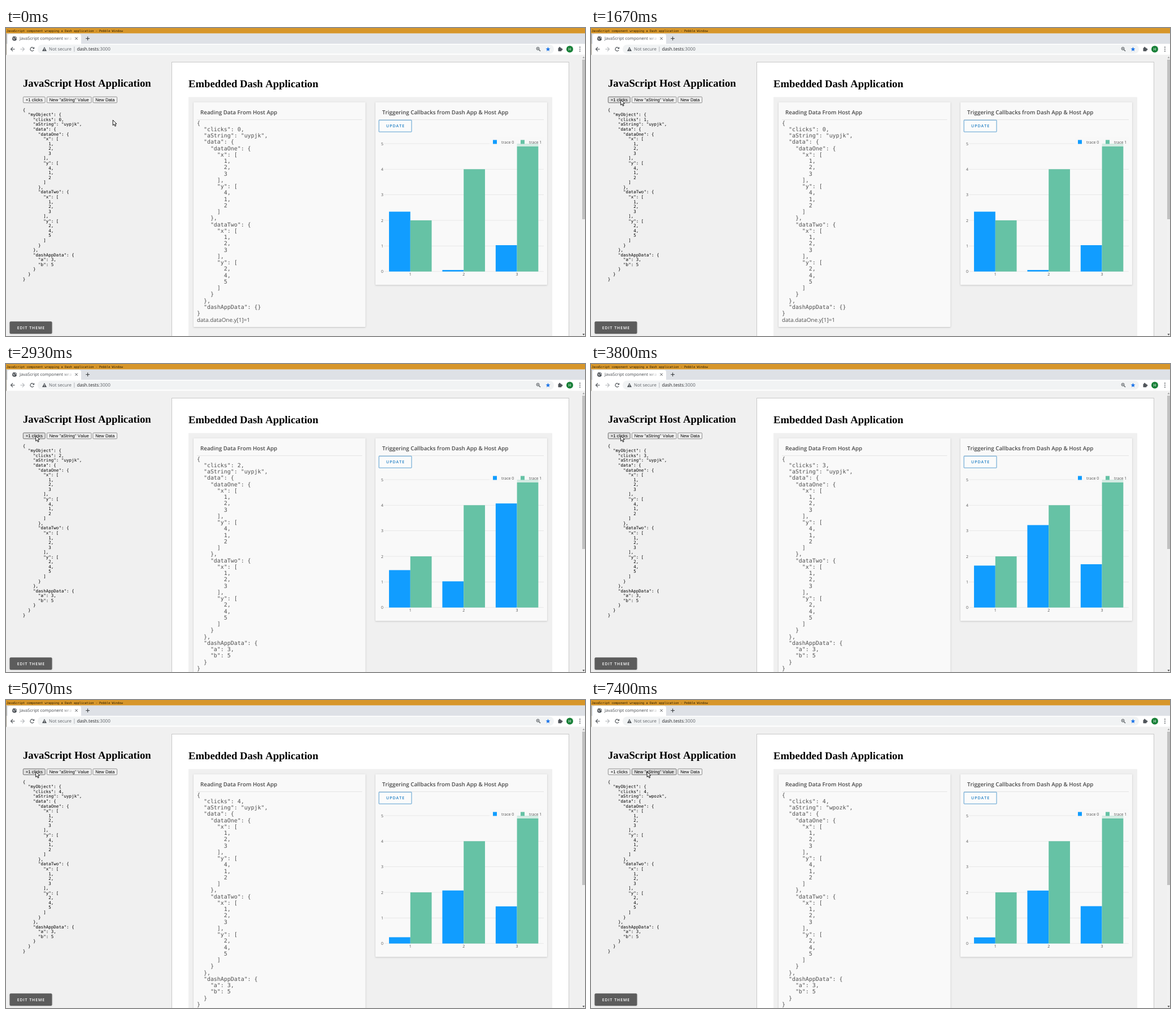
Write an HTML page with a canvas that moves like this. It is 1025x546 px and loops after 8 s.

```html
<!DOCTYPE html>
<html lang="en">
<head>
<meta charset="utf-8">
<title>Host application demo</title>
<style>
html, body { margin: 0; width: 100%; height: 100%; overflow: hidden; background: #f0f0f0; }
canvas { display: block; width: 1025px; height: 546px; }
</style>
</head>
<body>
<canvas id="stage" width="1025" height="546"></canvas>
<script>
const LOOP = 8000;
const FPS = 15;
const ctx = document.getElementById('stage').getContext('2d');
const SANS = '"Open Sans", sans-serif';
const ARIAL = '"Liberation Sans", sans-serif';
const SERIF = '"Liberation Serif", serif';
const MONO = '"DejaVu Sans Mono", monospace';

// ---- timeline ----
const hostClicks = [1670, 2730, 3600, 4530];
const dashClicks = [2200, 2730, 3600, 4670];
const words = [[0, 'uypjk'], [6330, 'zchzx'], [7400, 'wpozk']];
const presses = [
  [1530, 1670, 0], [2600, 2730, 0], [3400, 3600, 0], [4400, 4530, 0],
  [6200, 6330, 1], [7200, 7400, 1]
];
// Bar heights reached by each transition; `skip` is the step (mod 3) that repeats its predecessor.
const charts = [
  { at: 0, values: [2.34, 0.06, 1.03] },
  { at: 2200, values: [1.415, 0.655, 4.425] },
  { at: 2771, values: [1.76, 3.345, 1.82], duration: 500, skip: 0 },
  { at: 3642, values: [0.8, 2.375, 0.81], duration: 500, skip: 2 },
  { at: 4638, values: [0.24, 2.07, 1.46], duration: 500, skip: 0 }
];
// Pointer moves by frame step: [first, last, x, y]
const moves = [[6, 17, 52.3, 127], [76, 83, 95.8, 128.5], [84, 87, 98.8, 127]];
const buttons = [
  { x: 30, w: 39.6, label: '+1 clicks' },
  { x: 72, w: 79.5, label: 'New "aString" Value' },
  { x: 153.5, w: 43.5, label: 'New Data' }
];

const clamp = v => Math.max(0, Math.min(1, v));
const lerp = (a, b, p) => a + (b - a) * p;
const cubicInOut = p => p < 0.5 ? 4 * p ** 3 : 1 - 4 * (1 - p) ** 3;
const smooth = p => p * p * (3 - 2 * p);
const count = (times, t) => times.filter(at => t >= at).length;
const wordAt = t => words.filter(([at]) => t >= at).pop()[1];
const stepAt = t => Math.floor((t + 4) * FPS / 1000);

function barsAt(t) {
  let values = charts[0].values;
  const step = stepAt(t);
  for (const { at, values: next, duration, skip } of charts) {
    if (!duration) {
      if (t >= at) values = next;
      continue;
    }
    const shown = step % 3 === skip ? step - 1 : step;
    const p = cubicInOut(clamp((shown * 1000 / FPS - at) / duration));
    values = values.map((v, i) => lerp(v, next[i], p));
  }
  return values;
}

function pointerAt(t) {
  let x = 188.8, y = 163;
  const step = stepAt(t);
  for (const [first, last, toX, toY] of moves) {
    const p = smooth(clamp((step - first) / (last - first)));
    x = lerp(x, toX, p);
    y = lerp(y, toY, p);
  }
  return { x, y };
}

// ---- drawing helpers ----
function rect(x, y, w, h, fill) {
  ctx.fillStyle = fill;
  ctx.fillRect(x, y, w, h);
}

function box(x, y, w, h, r, fill, stroke, width = 0.8) {
  ctx.beginPath();
  ctx.roundRect(x, y, w, h, r);
  if (fill) { ctx.fillStyle = fill; ctx.fill(); }
  if (stroke) { ctx.strokeStyle = stroke; ctx.lineWidth = width; ctx.stroke(); }
}

function circle(x, y, r, fill) {
  ctx.beginPath();
  ctx.arc(x, y, r, 0, Math.PI * 2);
  ctx.fillStyle = fill;
  ctx.fill();
}

function line(points, color, width = 1) {
  ctx.beginPath();
  points.forEach(([x, y]) => ctx.lineTo(x, y));
  ctx.strokeStyle = color;
  ctx.lineWidth = width;
  ctx.stroke();
}

function polygon(points, fill) {
  ctx.beginPath();
  points.forEach(([x, y]) => ctx.lineTo(x, y));
  ctx.closePath();
  ctx.fillStyle = fill;
  ctx.fill();
}

function text(str, x, y, font, color, align = 'left', spacing = 0) {
  ctx.font = font;
  ctx.fillStyle = color;
  ctx.textAlign = align;
  ctx.letterSpacing = spacing + 'px';
  ctx.fillText(str, x, y);
}

function shadowed(blur, offset, alpha, draw) {
  ctx.save();
  ctx.shadowColor = `rgba(0,0,0,${alpha})`;
  ctx.shadowBlur = blur;
  ctx.shadowOffsetY = offset;
  draw();
  ctx.restore();
}

function json(data, x, y, size, pitch, color) {
  JSON.stringify(data, null, 2).split('\n').forEach((row, i) =>
    text(row, x, y + i * pitch, `${size}px ${MONO}`, color));
}

// ---- scene ----
function drawBrowser() {
  rect(0, 0, 1025, 9.7, '#d7962a');
  text('JavaScript component wrapping a Dash application - Pebble Window',
    1, 6.6, `5.35px ${MONO}`, '#2a1c00');
  rect(0, 9.7, 1025, 18.3, '#dee1e6');
  box(3, 10.5, 130, 22, 4, '#fff');
  rect(0, 28, 1025, 19.5, '#fff');
  rect(0, 9.7, 0.8, 38, '#77715f');

  circle(15, 18.7, 4, '#50555a');
  line([[12, 17.5], [14.5, 18.5], [14, 21]], '#fff', 0.9);
  line([[16, 15.5], [16.5, 17.5], [18.5, 18.5]], '#fff', 0.9);
  const fade = ctx.createLinearGradient(98, 0, 118, 0);
  fade.addColorStop(0, '#45494d');
  fade.addColorStop(1, 'rgba(69,73,77,0.1)');
  text('JavaScript component wra', 24, 21.3, `7.6px ${SANS}`, fade);
  line([[122.5, 16.5], [126.7, 20.7]], '#45494d');
  line([[126.7, 16.5], [122.5, 20.7]], '#45494d');
  line([[141.3, 18.6], [148, 18.6]], '#3c4043', 1.1);
  line([[144.6, 15.2], [144.6, 22]], '#3c4043', 1.1);

  for (const [x, dir, color] of [[12, -1, '#50555a'], [29, 1, '#b5b8bc']]) {
    line([[x - 3.6 * dir, 37.5], [x + 3.4 * dir, 37.5]], color, 1.1);
    line([[x, 34], [x + 3.5 * dir, 37.5], [x, 41]], color, 1.1);
  }
  ctx.beginPath();
  ctx.arc(46.3, 37.5, 3.2, 0.5, 5.4);
  ctx.strokeStyle = '#50555a';
  ctx.lineWidth = 1.1;
  ctx.stroke();
  polygon([[50.2, 33.5], [50.2, 37], [46.8, 37]], '#50555a');

  box(56, 29.5, 914, 16, 8, '#f1f3f4');
  polygon([[68, 33.5], [72, 41], [64, 41]], '#50555a');
  rect(67.5, 36, 1, 2.3, '#fff');
  rect(67.5, 39, 1, 1, '#fff');
  text('Not secure', 76, 40.4, `7.9px ${SANS}`, '#5f6368');
  rect(120.5, 33, 0.8, 9, '#a5a8ac');
  text('dash.tests', 125.5, 40.4, `8.15px ${SANS}`, '#202124');
  const hostWidth = ctx.measureText('dash.tests').width;
  text(':3000', 125.5 + hostWidth, 40.4, `8.15px ${SANS}`, '#5f6368');

  ctx.beginPath();
  ctx.arc(941.6, 36.5, 2.5, 0, Math.PI * 2);
  ctx.strokeStyle = '#50555a';
  ctx.lineWidth = 1;
  ctx.stroke();
  line([[943.4, 38.3], [946, 41]], '#50555a', 1.2);
  line([[940.3, 36.5], [942.9, 36.5]], '#50555a', 0.7);
  line([[941.6, 35.2], [941.6, 37.8]], '#50555a', 0.7);
  polygon(Array.from({ length: 10 }, (_, i) => {
    const r = i % 2 ? 1.8 : 4.2, a = i * Math.PI / 5 - Math.PI / 2;
    return [959.5 + r * Math.cos(a), 37.8 + r * Math.sin(a)];
  }), '#1a73e8');
  box(977.5, 35.2, 6, 6, 0.8, '#50555a');
  circle(980.2, 34.8, 1.4, '#50555a');
  circle(984, 38, 1.4, '#50555a');
  circle(998, 37.5, 6, '#188038');
  text('H', 998, 40.2, `7px ${SANS}`, '#fff', 'center');
  [34, 37.5, 41].forEach(y => circle(1016, y, 0.9, '#50555a'));
}

function drawHost(t, data, pointer) {
  text('JavaScript Host Application', 30, 103.5, `bold 18.73px ${SERIF}`, '#000');
  const pressed = presses.find(([from, to]) => t >= from && t < to);
  buttons.forEach(({ x, w, label }, i) => {
    const hover = pointer.x >= x && pointer.x < x + w && pointer.y > 121 && pointer.y < 133;
    let fill = '#efefef', border = '#767676';
    if (hover) { fill = '#e0e0e0'; border = '#4f4f4f'; }
    if (pressed && pressed[2] === i) { fill = '#f5f5f5'; border = '#8d8d8d'; }
    box(x + 0.4, 122, w - 0.8, 10.6, 1.5, fill, border);
    text(label, x + w / 2, 130.1, `7.8px ${ARIAL}`, '#000', 'center');
  });
  json({ myObject: data }, 29.8, 147.8, 7.56, 8.565, '#000');
}

function drawCard(x, w, h, title) {
  shadowed(2.5, 0.8, 0.22, () => box(x, 131.5, w, h, 1, '#f9f9f9'));
  text(title, x + 12, 153.2, `600 9.8px ${SANS}`, '#4a4a4a');
  rect(x + 6, 162, w - 12, 0.9, '#e3e3e3');
}

function drawChart(values) {
  const zero = 431.7, unit = 45.35, barWidth = 37.75;
  const font = `7.02px ${SANS}`, ink = '#555';
  for (let v = 0; v <= 5; v++) {
    const y = zero - v * unit;
    rect(669, y - 0.4, 283, 0.8, '#e4e4e4');
    text(String(v), 668, y + 2.6, font, ink, 'right');
  }
  [2, 4, 5].forEach((v, i) => {
    const mid = 715.8 + i * 94.4;
    rect(mid - barWidth, zero - values[i] * unit, barWidth, values[i] * unit, '#119dff');
    rect(mid, zero - v * unit, barWidth, v * unit, '#66c2a5');
    text(String(i + 1), mid, 439.2, font, ink, 'center');
  });
  rect(856, 194, 96, 16, 'rgba(249,249,249,0.75)');
  [[862, '#119dff', 'trace 0'], [911, '#66c2a5', 'trace 1']].forEach(([x, color, label]) => {
    rect(x, 198.5, 7, 7, color);
    text(label, x + 15, 204.8, font, ink);
  });
}

function drawEmbedded(t, data) {
  const grown = t >= dashClicks[0];
  rect(293, 60, 704, 490, '#c8c8c8');
  rect(294, 61, 702, 490, '#fff');
  text('Embedded Dash Application', 323, 104.5, `bold 18.73px ${SERIF}`, '#000');
  rect(323, 122.5, 644, 430, '#f0f0f0');

  drawCard(332, 304.5, grown ? 432 : 398.5, 'Reading Data From Host App');
  json(data, 338, 171.5, 9.93, 11.25, '#505050');
  text('data.dataOne.y[1]=1', 338, grown ? 566.3 : 521.3, `9.9px ${SANS}`, '#505050');

  drawCard(654, 304, 324, 'Triggering Callbacks from Dash App & Host App');
  box(660.2, 163.3, 57.8, 20.8, 0.5, '#fbfbfb', '#2f86c6');
  text('UPDATE', 689.5, 176.2, `600 7px ${SANS}`, '#1f7fc4', 'center', 1);
  drawChart(barsAt(t));
}

function drawScrollbar(grown) {
  rect(1019.5, 47.5, 5.5, 499, '#f1f1f1');
  rect(1020, 56, 5, (grown ? 328 : 339) - 56, '#c1c1c1');
  polygon([[1022.5, 50.5], [1024.5, 53.5], [1020.5, 53.5]], '#a0a0a0');
  polygon([[1022.5, 545], [1024.5, 542], [1020.5, 542]], '#505050');
}

function drawPointer({ x, y }) {
  const shape = [[0, 0], [0, 9.4], [2.2, 7.5], [3.8, 11], [5.4, 10.3], [3.9, 6.9], [6.7, 6.7]];
  ctx.save();
  ctx.translate(x + 0.4, y + 0.2);
  ctx.lineJoin = 'round';
  polygon(shape, '#fff');
  line([...shape, shape[0]], '#111', 1);
  ctx.restore();
}

function draw(t) {
  const data = (clicks, dashAppData) => ({
    clicks,
    aString: wordAt(t),
    data: {
      dataOne: { x: [1, 2, 3], y: [4, 1, 2] },
      dataTwo: { x: [1, 2, 3], y: [2, 4, 5] }
    },
    dashAppData
  });
  const sums = { a: 3, b: 5 };
  const received = count(dashClicks, t);
  const pointer = pointerAt(t);

  ctx.textRendering = 'geometricPrecision';
  ctx.fontKerning = 'none';
  rect(0, 0, 1025, 546, '#f0f0f0');
  drawBrowser();
  drawHost(t, data(count(hostClicks, t), sums), pointer);
  drawEmbedded(t, data(received, received ? sums : {}));
  drawScrollbar(received > 0);
  shadowed(2.5, 0.6, 0.22, () => box(6.5, 520.3, 75, 21.7, 2, '#5c5c5c'));
  text('EDIT THEME', 44.4, 533.8, `600 7px ${SANS}`, '#fff', 'center', 0.9);
  drawPointer(pointer);
}

const start = performance.now();
function tick() {
  draw((performance.now() - start) % LOOP);
  requestAnimationFrame(tick);
}
tick();
</script>
</body>
</html>
```
